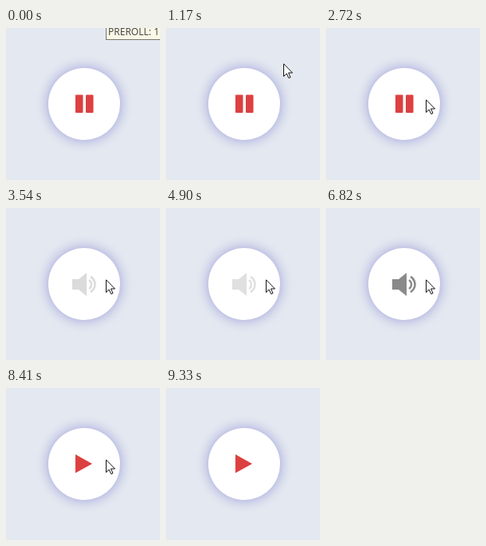
An HTML page with a canvas that plays this animation: 193x190 px, repeating every 9760 ms.

```html
<!DOCTYPE html>
<html lang="en">
<head>
<meta charset="utf-8">
<title>Player button</title>
<style>
html, body { margin: 0; width: 100%; height: 100%; overflow: hidden; background: #e4e9f1; }
canvas { display: block; }
</style>
</head>
<body>
<canvas id="stage" width="193" height="190"></canvas>
<script>
const ctx = document.getElementById('stage').getContext('2d');
const LOOP = 9760;
const RED = '#dc4040';

const progress = (t, from, to) => Math.min(1, Math.max(0, (t - from) / (to - from)));
const mix = (a, b, p) => a + (b - a) * p;
const smooth = p => p * p * (3 - 2 * p);

function polygon(points) {
  ctx.beginPath();
  points.forEach(([x, y]) => ctx.lineTo(x, y));
  ctx.closePath();
}

function shifted(dx, alpha, draw) {
  ctx.save();
  ctx.globalAlpha = alpha;
  ctx.translate(dx, 0);
  draw();
  ctx.restore();
}

function drawButton() {
  const glow = ctx.createRadialGradient(98, 95, 44, 98, 95, 63);
  glow.addColorStop(0, 'rgba(164,164,218,.62)');
  glow.addColorStop(0.25, 'rgba(176,178,222,.4)');
  glow.addColorStop(0.6, 'rgba(196,200,228,.2)');
  glow.addColorStop(1, 'rgba(210,215,232,0)');
  ctx.fillStyle = glow;
  ctx.fillRect(30, 27, 136, 136);
  ctx.fillStyle = '#fff';
  ctx.beginPath();
  ctx.arc(98, 95, 45, 0, Math.PI * 2);
  ctx.fill();
}

function drawPause() {
  ctx.fillStyle = RED;
  ctx.beginPath();
  ctx.roundRect(87, 83.5, 9.5, 22.5, 1);
  ctx.roundRect(100, 83.5, 9.5, 22.5, 1);
  ctx.fill();
}

function drawPlay() {
  ctx.fillStyle = RED;
  polygon([[87, 83], [108, 94.7], [87, 106.3]]);
  ctx.fill();
}

function drawSpeaker(shade) {
  const color = `rgb(${shade},${shade},${shade})`;
  ctx.fillStyle = color;
  polygon([[83, 89], [91, 89], [101, 81], [101, 110], [91, 102], [83, 102]]);
  ctx.fill();
  ctx.strokeStyle = color;
  ctx.lineWidth = 2.5;
  for (const [x, radius, spread] of [[100.5, 6.5, 1], [100.5, 11, 1.05]]) {
    ctx.beginPath();
    ctx.arc(x, 95.5, radius, -spread, spread);
    ctx.stroke();
  }
}

function drawIcon(t) {
  if (t < 2930 || (t >= 7270 && t < 7990)) {
    drawPause();
  } else if (t < 7270) {
    const dim = progress(t, 3470, 3545) - progress(t, 5700, 5960);
    drawSpeaker(Math.round(mix(138, 224, dim)));
  } else {
    const p = smooth(progress(t, 7970, 8410));
    shifted(mix(0, 14, p), Math.max(0, 1 - p * 1.6), drawPause);
    shifted(mix(-14, 0, p), p, drawPlay);
  }
}

function cursorPosition(t) {
  if (t < 1010 || t >= 9330) return null;
  if (t < 8970) {
    const u = 1 - (1 - progress(t, 1010, 1510)) ** 3;
    const curve = (a, b, c) => mix(mix(a, b, u), mix(b, c, u), u);
    return [curve(192, 161, 125), curve(-6, 6, 89)];
  }
  const p = progress(t, 8945, 9330) ** 2;
  return [mix(125, 154, p), mix(89, 190, p)];
}

function drawCursor(t) {
  const position = cursorPosition(t);
  if (!position) return;
  ctx.save();
  ctx.translate(...position.map(Math.round));
  polygon([[0.5, 0.8], [0.5, 16.5], [4.2, 13], [6.8, 18.5], [9, 17.5], [6.5, 12], [11.5, 12]]);
  ctx.fillStyle = '#fff';
  ctx.fill();
  ctx.strokeStyle = '#111';
  ctx.lineWidth = 1;
  ctx.stroke();
  ctx.restore();
}

function drawTooltip() {
  ctx.fillStyle = '#faf8e6';
  ctx.fillRect(125, 0, 68, 15);
  ctx.fillStyle = '#77776f';
  ctx.fillRect(125, 0, 1, 15);
  ctx.fillRect(125, 14, 68, 1);
  ctx.fillStyle = '#4a4a48';
  ctx.font = '12px "Noto Sans", sans-serif';
  ctx.fillText('PREROLL: 1', 128, 9);
}

function draw(t) {
  ctx.fillStyle = '#e4e9f1';
  ctx.fillRect(0, 0, 193, 190);
  drawButton();
  drawIcon(t);
  drawCursor(t);
  if (t < 20) drawTooltip();
}

const start = performance.now();
function tick() {
  draw((performance.now() - start) % LOOP);
  requestAnimationFrame(tick);
}
draw(0);
requestAnimationFrame(tick);
</script>
</body>
</html>
```
